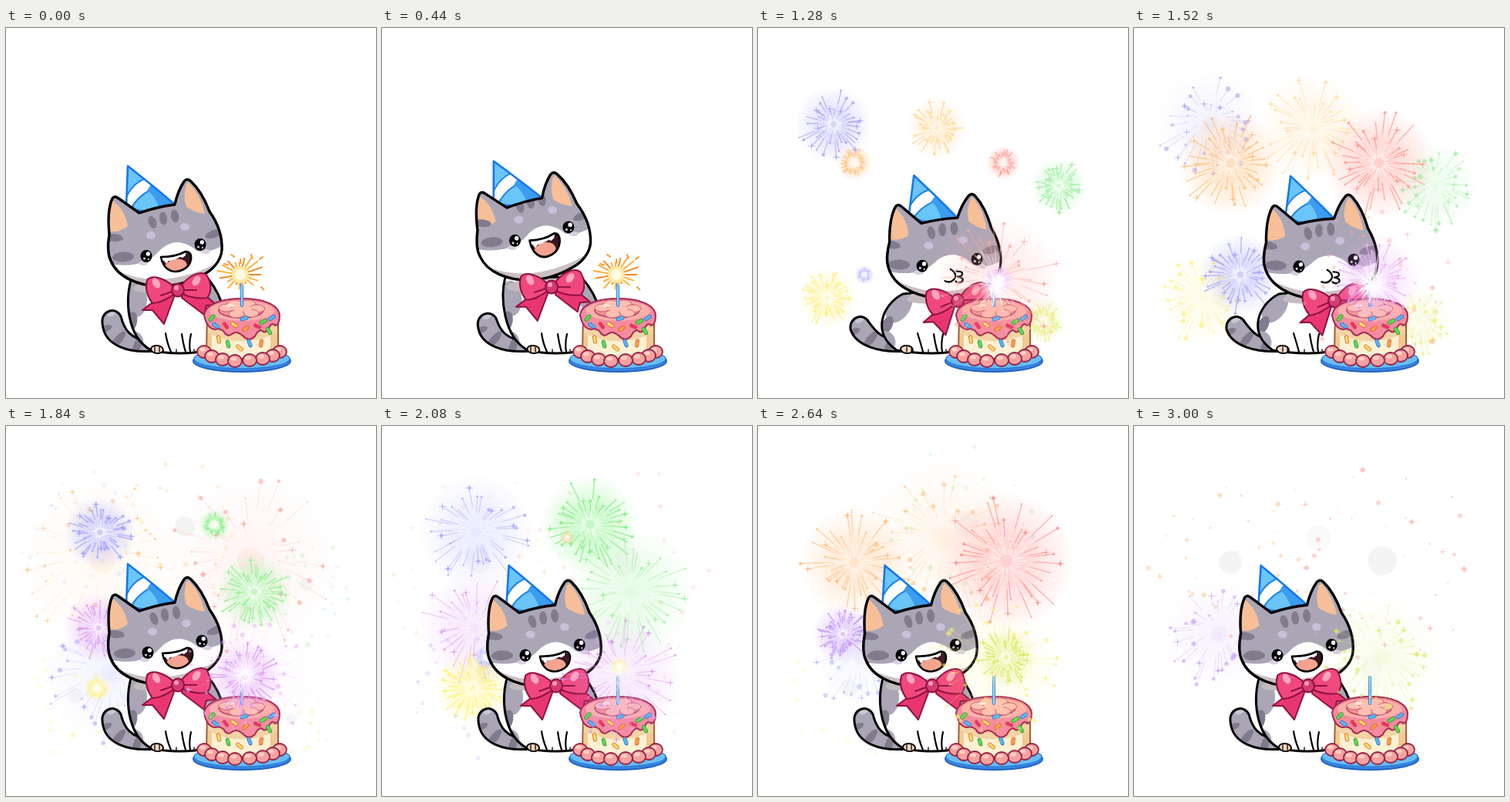
An HTML page with a canvas that plays this animation: 480 px wide and 480 px high, repeating every 3.04 s.

```html
<!DOCTYPE html>
<html lang="en">
<head>
<meta charset="utf-8">
<title>Birthday cat</title>
<style>
html, body { margin: 0; width: 100%; height: 100%; overflow: hidden; background: #fff; }
canvas { display: block; }
</style>
</head>
<body>
<canvas id="stage" width="480" height="480"></canvas>
<script>
const c = document.getElementById('stage').getContext('2d');
const LOOP = 3040, TAU = Math.PI * 2;
const GREY = '#aaa6b6', DARK = '#827b8d', PINK = '#e93672', WINE = '#8d1140';
let t = 0;

const rnd = n => { const s = Math.sin(n * 127.1 + 3.7) * 43758.5453; return s - Math.floor(s); };
const clamp = v => Math.max(0, Math.min(1, v));

// time, head x, y, turn, face x, y, bow x, y, body lean
const POSES = [
  [0, 0, 0, 0, 0, 0, 0, 0, 0],
  [360, -10, -8, -2, 0, -13, -3, -4, -.12],
  [560, -10, -8, -2, 0, -13, -3, -4, -.12],
  [760, 34, 14, 5, -3, -1, 35, 13, 1],
  [1000, 35, 15, 5, -3, -1, 35, 13, 1],
  [1520, 37, 17, 5, -3, -1, 37, 14, 1],
  [1600, 37, 17, 5, -3, -1, 37, 14, 1],
  [1780, 0, 0, 0, 2, -2, 0, -4, 0],
  [1840, 0, 0, 0, 2, -2, 0, -4, 0],
  [2040, 4.5, 3, 1.3, 0, -1, 3, -3, 0],
  [LOOP, 4.5, 3, 1.3, 0, -1, 3, -3, 0]
];

function poseAt() {
  const i = POSES.findIndex(p => p[0] > t), a = POSES[i - 1], b = POSES[i];
  const u = (t - a[0]) / (b[0] - a[0]), e = u * u * (3 - 2 * u);
  return a.slice(1).map((v, k) => v + (b[k + 1] - v) * e);
}

function path(d, fill, stroke, w = 2) {
  const p = new Path2D(d);
  if (fill) { c.fillStyle = fill; c.fill(p); }
  if (stroke) { c.strokeStyle = stroke; c.lineWidth = w; c.stroke(p); }
}

function oval(x, y, rx, ry, fill, turn = 0, stroke, w = 1.5) {
  c.beginPath();
  c.ellipse(x, y, rx, ry, turn, 0, TAU);
  if (fill) { c.fillStyle = fill; c.fill(); }
  if (stroke) { c.strokeStyle = stroke; c.lineWidth = w; c.stroke(); }
}

// Filled shape with details kept inside its outline
function shape(d, fill, inside, w = 3.4, line = '#000') {
  path(d, fill);
  c.save();
  c.clip(new Path2D(d));
  inside();
  c.restore();
  path(d, null, line, w);
}

function group(x, y, turn, px, py, draw) {
  c.save();
  c.translate(px + x, py + y);
  c.rotate(turn * Math.PI / 180);
  c.translate(-px, -py);
  draw();
  c.restore();
}

function glow(x, y, r, color, alpha) {
  const g = c.createRadialGradient(x, y, 0, x, y, r);
  g.addColorStop(0, color);
  g.addColorStop(.45, color + '99');
  g.addColorStop(1, color + '00');
  c.globalAlpha = alpha;
  oval(x, y, r, r, g);
  c.globalAlpha = 1;
}

function tail(k) {
  const y = k > 0 ? k * 8 : k * -30, x = -Math.abs(k) * 5;
  shape(`M192 419 C160 422 127 413 ${125 + x} ${383 + y}
    C${123 + x} ${366 + y} ${143 + x} ${361 + y} ${149 + x} ${374 + y}
    C153 ${390 + y / 2} 160 404 188 407 Z`, GREY, () => {
    oval(129 + x, 390 + y / 2, 9, 4, DARK, -.4);
    oval(146, 404, 5, 13, DARK, .7);
    oval(170, 413, 5, 12, DARK, .35);
    oval(137 + x, 371 + y, 6, 3, '#c9c6d2', -.4);
  }, 3);
}

function body(k) {
  const x = 163 + k * 25, y = 325 + k * 20;
  shape(`M${x} ${y} C${154 + k * 8} ${350 + k * 8} ${156 - k * 10} ${400 - k * 5} ${188 - k * 8} 418
    Q215 424 245 421 L282 412 C288 380 284 352 ${262 + k * 25} ${325 + k * 10} Z`, '#fff', () => {
    oval(169 + k * 14, 352 + k * 10, 14, 23, GREY, k * .6);
    oval(163 + k * 4, 381 + k * 5, 7, 13, DARK, .2 + k * .3);
    oval(167, 406, 11, 13, GREY, -.4);
    oval(270, 350, 17, 16, GREY, .6);
    oval(213 + k * 28, 334 + k * 14, 48, 9, '#c4bbc0', -.08);
  }, 3);
  oval(196 - k * 3, 417, 8, 5, '#f6d8c2', .1, '#000', 2);
  path(`M207 396 Q${209 + k * 2} 409 214 420 M228 397 Q230 411 233 420 M240 397 Q237 410 239 420`, null, '#000', 2.2);
  path('M193 414 v6 M199 414 v6 M221 417 v4 M244 417 v4', null, '#000', 1.3);
}

function hat() {
  shape('M158 179 L156 232 Q185 245 218 228 Q190 204 158 179 Z', '#6ac5fa', () => {
    path('M155 222 Q163 202 181 195 L195 207 Q173 215 163 233 L154 233 Z', '#fff', '#1b82ef', 2);
    path('M188 203 L220 226 L199 234 Q193 216 183 211 Z', '#3b9cf0');
  }, 2.6, '#1478ee');
}

function mouth(open) {
  c.save();
  c.translate(220, 300);
  c.scale(1, open);
  shape('M-19 -3 Q0 -3 13 -10 Q21 -10 20 0 C18 13 3 18 -6 15 C-14 12 -18 4 -19 -3 Z', '#3b1420', () => {
    oval(0, 10, 15, 10, '#f3a38f', -.25);
    path('M-20 -5 Q0 -5 14 -12 L13 -5 L9 -2 L6 -3 Q-3 2 -9 2 L-12 6 L-15 2 L-20 1 Z', '#fff');
  }, 2.6);
  c.restore();
}

function head(fx, fy, blow) {
  hat();
  shape(`M134 268 C132 248 133 232 138 221 Q141 217 146 221 L173 240 Q196 232 219 229
    Q223 211 231 199 Q235 194 240 199 Q254 212 264 238 C274 252 281 268 280 288
    C279 302 268 314 256 320 C236 331 216 335 198 335 C172 334 145 324 136 302
    C131 292 132 280 134 268 Z`, GREY, () => {
    path('M136 222 Q154 234 158 257 Q147 266 132 264 Z', '#f7bf98');
    path('M234 203 Q229 219 234 232 Q244 239 258 241 Q252 215 236 200 Z', '#f7bf98');
    c.save();
    c.translate(fx, fy);
    path('M120 302 C150 312 181 309 197 291 Q209 277 225 278 Q240 281 247 289 Q267 294 290 276 V370 H120 Z', '#fff');
    [[190, 252, -.35], [204, 247, -.1], [219, 244, -.15]].forEach(([x, y, a]) => oval(x, y, 5, 8.5, DARK, a));
    oval(152, 297, 14, 6.5, DARK, -.05);
    oval(140, 272, 12, 5, DARK, .1);
    oval(270, 267, 12, 5, DARK, -.35);
    oval(188, 269, 6, 5, '#c6c0da');
    oval(232, 258, 6, 5, '#c6c0da');
    oval(178, 305, 6, 3, '#d9cde2');
    oval(259, 290, 6, 3, '#d9cde2');
    c.restore();
    path('M130 308 Q165 328 204 326 Q245 322 282 300 L280 345 H130 Z', '#cbbfc3');
  });
  c.save();
  c.translate(fx, fy);
  [[182, 296], [252, 281]].forEach(([x, y]) => {
    oval(x, y, 7.5, 8, '#000');
    oval(x + 2.3, y - 3, 2.7, 2.8, '#fff');
    oval(x - 2.5, y + 3, 1.6, 1.6, '#cfc9d8');
    oval(x + 3, y + 4, 1, 1, '#fff');
  });
  if (blow) path('M213 313 Q222 316 226 307 Q227 301 219 297 M227 299 Q237 298 234 304 Q231 306 229 306 Q239 307 235 312 Q231 315 227 312', '#fff', '#000', 2.3);
  else mouth(1 - Math.min(0, fy) * .012);
  c.restore();
}

function bow() {
  path('M216 342 L190 356 L177 366 L190 366 L205 384 L218 349 Z', PINK, WINE, 2);
  path('M229 341 L256 345 L273 359 L260 360 L257 372 L228 350 Z', PINK, WINE, 2);
  path('M219 337 C207 325 190 319 183 327 C180 338 184 349 190 357 C202 357 212 349 219 345 Z', '#f0487e', WINE, 2);
  path('M227 335 C236 322 251 314 260 320 C267 331 267 343 261 350 C247 352 235 348 227 344 Z', '#f0487e', WINE, 2);
  path('M218 341 L201 347 M229 340 L247 340', null, WINE, 2);
  oval(223, 340, 8, 8.5, '#d43a72', 0, WINE, 2);
  oval(195, 331, 4.5, 7, '#ffa5bd', -.5);
  oval(247, 328, 4.5, 7, '#ffa5bd', .6);
  oval(221, 337, 3, 3, '#ff9dba');
}

function cake() {
  oval(306, 432, 63, 14, '#3a86de', 0, '#2264c4', 2);
  oval(306, 429, 62, 13, '#66bdf6', 0, '#2a78d6', 1.2);
  shape('M261 372 L260 419 Q305 440 353 419 L353 372 Z', '#fdf1d3', () => {
    path('M258 370 h9 v60 h-9 Z M343 370 h12 v60 h-12 Z', '#f0ca92');
    path('M258 394 Q306 419 355 394 V388 H258 Z', '#f4d4a4');
  }, 2, '#a75b38');
  [[257, 420], [355, 420], [267, 426], [346, 425], [281, 430], [333, 429], [297, 432], [316, 431]].forEach(([x, y]) => {
    oval(x, y, 9, 8, '#f4a29f', 0, '#972047', 1.8);
    oval(x - 2, y - 3, 4, 2.5, '#ffd0c2');
  });
  path(`M257 373 C258 357 283 351 306 351 C332 351 354 358 355 373 Q355 385 349 386
    Q345 381 341 389 Q337 398 331 392 Q326 393 323 400 Q315 408 307 399 Q299 392 293 397
    Q287 402 282 393 Q276 389 272 391 Q261 391 257 373 Z`, '#f48b9f', '#a62850', 2);
  oval(306, 367, 42, 13, '#fab0aa');
  oval(305, 366, 29, 10, '#f39396', 0, '#b53b5d', 1.5);
  [[286, 363], [297, 358], [314, 358], [326, 364], [318, 370], [299, 371]].forEach(([x, y]) => oval(x, y, 10, 5, '#ffbfb2', 0, '#cf637a', 1));
  oval(306, 364, 13, 4, '#ffbfb2');
  oval(291, 360, 5, 2, '#ffe2d8');
  const tones = ['#5fdc4c', '#56b9f5', '#ffe05a', '#ec2f6d', '#ffa13d'];
  [[267, 376, 0, -.8], [309, 377, 1, -.3], [334, 381, 0, -.5], [285, 386, 3, .9], [311, 390, 4, -.7],
   [345, 376, 1, -.6], [296, 385, 2, .6], [326, 387, 3, .4], [272, 386, 1, .6], [288, 410, 0, 1.3],
   [316, 409, 1, 1.2], [331, 409, 4, 1.7], [341, 393, 0, 1], [276, 404, 2, 1.4], [303, 415, 2, .7]
  ].forEach(([x, y, n, a]) => {
    c.lineCap = 'round';
    const dx = Math.cos(a) * 3, dy = Math.sin(a) * 3;
    const d = `M${x - dx} ${y - dy} L${x + dx} ${y + dy}`;
    path(d, null, n == 0 ? '#2b9640' : n == 1 ? '#2873cb' : '#d85c3e', 5);
    path(d, null, tones[n], 3.4);
  });
}

function sparkler() {
  path('M306 360 V326', null, '#2d83df', 4);
  path('M306 360 V326', null, '#8bd5ff', 2);
  const lit = clamp((1080 - t) / 260);
  if (lit) {
    c.globalAlpha = lit;
    const beat = 1 + .12 * (Math.cos(t * TAU / 220) - 1);
    for (let i = 0; i < 19; i++) {
      const a = i * TAU / 19, r = (13 + 17 * rnd(i + 2)) * beat;
      path(`M304 320 L${304 + Math.cos(a) * r} ${320 + Math.sin(a) * r}`, null, i % 3 ? '#ffb13b' : '#f98a25', 2);
    }
    oval(304, 320, 11, 11, '#ffe9a3');
    oval(304, 320, 7, 7, '#fffbe4');
    [[292, 294, .6], [318, 294, 1.2], [329, 300, -.6], [283, 306, .3], [331, 336, .8], [304, 300, 1.5]].forEach(([x, y, a]) =>
      path(`M${x} ${y} l${Math.cos(a) * 5} ${Math.sin(a) * 5}`, null, '#f99a32', 2));
    c.globalAlpha = 1;
  }
}

// x, y, colour, start, reach
const SKY = [
  [98, 125, '#a9a5f5', 930, 82], [390, 205, '#a5efa5', 1000, 70],
  [90, 350, '#fff08a', 1000, 75], [370, 380, '#e9f08a', 1000, 55],
  [232, 130, '#ffdca0', 1080, 100], [125, 175, '#ffc07c', 1200, 125],
  [318, 175, '#ff9c92', 1210, 135], [138, 320, '#a8a8ff', 1240, 105],
  [122, 138, '#a6a6ff', 1580, 98], [322, 215, '#98f098', 1600, 115],
  [120, 262, '#deA0f2', 1600, 100], [118, 340, '#fff06c', 1760, 88],
  [270, 128, '#84f084', 1770, 120], [135, 300, '#a8b0ff', 2000, 75],
  [240, 145, '#ffc584', 2060, 125], [125, 177, '#ffbd80', 2260, 115],
  [322, 175, '#ff8f8f', 2260, 145], [110, 270, '#c79cf5', 2400, 85]
];
const CANDLE = [
  [310, 326, '#ffaaa0', 800, 115], [312, 328, '#eab0f8', 1190, 105],
  [310, 325, '#dd9cf5', 1600, 110], [308, 312, '#f8f07a', 2040, 110],
  [322, 300, '#dcea66', 2400, 90]
];

function burst([x, y, color, start, reach], id) {
  const p = (t - start) / 1000;
  if (p < 0 || p > 1) return;
  const r = reach * (1 - (1 - p) ** 2), bright = clamp((.72 - p) * 2.2);
  glow(x, y, r * .95 + 5, color, .75 * bright * (p < .2 ? 1 : .75));
  if (p > .5) {
    c.globalAlpha = .35 * clamp((p - .5) * 5) * (1.1 - p);
    oval(x, y, reach * .13, reach * .13, p > .7 ? '#aaa' : color);
  }
  for (let j = 0; j < 34; j++) {
    const n = id * 41 + j, a = (j + rnd(n)) * TAU / 34, len = r * (.42 + .58 * rnd(n + 900));
    const dx = Math.cos(a), dy = Math.sin(a), ex = x + dx * len, ey = y + dy * len + 16 * p * p;
    if (bright) {
      c.globalAlpha = bright * .85;
      const inner = len * (.05 + p * .9);
      if (inner < len) path(`M${x + dx * inner} ${y + dy * inner} L${ex} ${ey}`, null, color, 1.4);
      path(`M${x + dx * r * .1} ${y + dy * r * .1} L${x + dx * len * .55} ${y + dy * len * .55}`, null, '#fff', 1.1);
    }
    if (p > .15) {
      c.globalAlpha = clamp((1 - p) * 1.9) * .75;
      const s = (.8 + 2 * rnd(n + 500)) * (p > .5 ? 1.15 : .8);
      oval(ex, ey, s, s, color);
      if (j % 4 == 0) path(`M${ex - 4} ${ey} h8 M${ex} ${ey - 4} v8`, null, color, 1);
    }
  }
  c.globalAlpha = 1;
  if (p < .16) glow(x, y, 5 + p * 75, '#ffffff', .95);
}

function candleGlow() {
  const on = clamp((t - 820) / 160) * (1 - .9 * clamp((t - 1600) / 900));
  if (!on) return;
  const y = 336 - 16 * clamp((t - 1500) / 300);
  glow(309, y, 23, '#ffffff', on);
  c.globalAlpha = on * .8;
  for (let i = 0; i < 12; i++) {
    const a = i * TAU / 12 + .2, r = 12 + 15 * rnd(i + Math.floor(t / 80));
    path(`M309 ${y} L${309 + Math.cos(a) * r} ${y + Math.sin(a) * r}`, null, '#fff', 1.2);
  }
  c.globalAlpha = 1;
}

function frame(now) {
  t = Math.floor(now % LOOP / 40) * 40;
  const [x, y, turn, fx, fy, bx, by, lean] = poseAt();
  c.fillStyle = '#fff';
  c.fillRect(0, 0, 480, 480);
  c.lineJoin = c.lineCap = 'round';
  SKY.forEach(burst);
  tail(lean);
  body(lean);
  group(x, y, turn, 206, 270, () => head(fx, fy, t >= 640 && t < 1680));
  group(bx, by, lean * -3, 223, 340, bow);
  cake();
  sparkler();
  CANDLE.forEach((b, i) => burst(b, i + 30));
  candleGlow();
  requestAnimationFrame(frame);
}
const begin = performance.now();
requestAnimationFrame(() => frame(performance.now() - begin));
</script>
</body>
</html>
```
